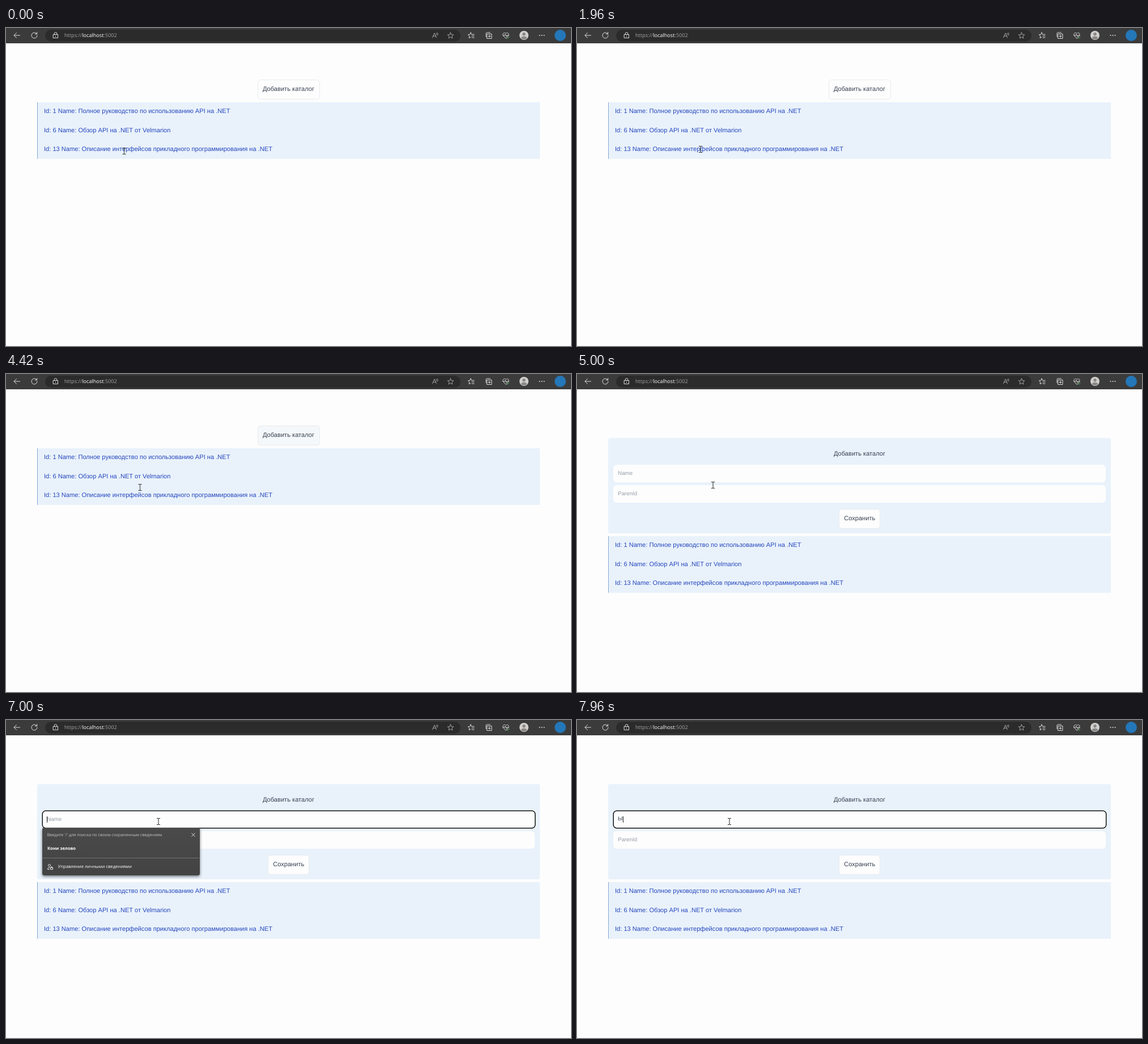
Write an HTML page that moves like this. It is 997 by 561 pixels and loops after 8000 ms.

```html
<!DOCTYPE html>
<html lang="ru">
<head>
<meta charset="utf-8">
<title>Каталог</title>
<style>
html, body { margin: 0; width: 100%; height: 100%; overflow: hidden; }
body {
  position: relative; background: #fdfdfd; color: #374151;
  font: 11.1px/16.62px "Liberation Sans", Arial, sans-serif;
  text-rendering: geometricPrecision; cursor: default;
}
#stage { position: absolute; left: 0; top: 0; width: 997px; height: 561px; overflow: hidden; }
#stage > *, .form > *, .fill > *, .layout > * { position: absolute; box-sizing: border-box; white-space: nowrap; }
.ui { font-family: "Open Sans", "Noto Sans", sans-serif; }

/* every timeline shares one loop */
.anim { animation: 8s step-end infinite; }

.bar { left: 0; top: 0; }

/* tree */
ul { margin: 0; padding: 0 0 0 10.6px; list-style: none; border-left: 1px solid #83a8d4; overflow: hidden; }
li { padding: 8.3px 0; color: #2546bd; }
li:has(ul) { padding-bottom: 0; }
li > ul { margin-bottom: 8.3px; }
.tree { left: 55.4px; top: 131px; width: 886.2px; background: #e9f2fb; animation-name: shift; }
.outer { animation-name: outer; }
.inner { animation-name: inner; }
@keyframes shift { 0%, 100% { transform: none; } 56.25% { transform: translateY(155px); } }
@keyframes outer { 0%, 100% { max-height: 0; } 3.125% { max-height: 100px; } 22.5% { max-height: 0; } }
@keyframes inner { 0%, 100% { max-height: 0; } 6.5% { max-height: 100px; } 18.75% { max-height: 0; } }

/* buttons and form */
.btn {
  display: flex; align-items: center; justify-content: center; height: 35px;
  background: #fdfdfd; border: 1px solid #e8ebee; border-radius: 5px;
}
.add { left: 443.5px; top: 90.5px; width: 110px; animation-name: add; }
@keyframes add {
  0%, 100% { visibility: visible; background: #fdfdfd; }
  43.5% { visibility: visible; background: #f5f8fa; }
  56.25% { visibility: hidden; }
}
.form { left: 55.4px; top: 112.5px; width: 886.2px; height: 168px; background: #e9f2fb; border-radius: 4px; animation-name: form; }
@keyframes form { 0%, 100% { visibility: hidden; } 56.25% { visibility: visible; } }
.form h1 { margin: 0; left: 0; right: 0; top: 20px; font: inherit; text-align: center; }
.field {
  left: 8.3px; width: 869.6px; height: 31px; padding-left: 8.5px; border-radius: 6px;
  background: #fdfdfd; color: #979da8; font-size: 9.7px; line-height: 31px;
}
.save { left: 406.6px; top: 125px; width: 73.5px; }
.focus {
  left: 65px; top: 161px; width: 868px; height: 29px; border-radius: 5px;
  box-shadow: 0 0 0 1.5px #111; animation-name: focus;
}
@keyframes focus { 0%, 100% { visibility: hidden; } 73% { visibility: visible; } }

.hint { animation-name: hint; }
@keyframes hint { 0%, 100% { visibility: hidden; } 56.25% { visibility: visible; } 97.8% { visibility: hidden; } }
.typed { left: 72px; top: 167px; font-size: 9.7px; animation-name: typed; }
@keyframes typed { 0%, 100% { visibility: hidden; } 97.8% { visibility: visible; } }
.caret { left: 72px; top: 170px; width: 1px; height: 11px; background: #222; animation-name: caret; }
@keyframes caret {
  0%, 100% { visibility: hidden; transform: none; }
  73.5% { visibility: visible; }
  79.25% { visibility: hidden; }
  86% { visibility: visible; }
  93.2% { visibility: hidden; }
  97.8% { visibility: visible; transform: translateX(9px); }
}

/* autofill list */
.fill {
  left: 64.4px; top: 190.4px; width: 277.4px; height: 83.4px; border-radius: 3px; color: #fff;
  background: linear-gradient(#4a4a4a, #434343); box-shadow: 0 2px 5px #0008; animation-name: fill;
}
@keyframes fill { 0%, 100% { visibility: hidden; } 73% { visibility: visible; } 97.8% { visibility: hidden; } }
.fill .tip { left: 8px; top: 4.5px; font-size: 7.25px; color: #c4c4c4; }
.fill b { left: 8.5px; top: 29px; font-size: 7.6px; }
.fill .manage { left: 27px; top: 61px; font-size: 7.7px; }
.fill svg { left: 0; top: 0; }

/* keyboard layout flyout */
.layout {
  left: 740px; top: 526.5px; width: 248px; height: 60px; border-radius: 6px; color: #fff;
  background: linear-gradient(#232323 33px, #4a4a4a 33px, #4a4a4a 34px, #232323 34px);
  box-shadow: 0 0 5px #0007; animation: layout 8s ease-out infinite;
}
@keyframes layout {
  0%, 90% { transform: translateY(45px); }
  92%, 94% { transform: none; }
  96.5%, 100% { transform: translateY(45px); }
}
.layout .name { left: 10px; top: 8.8px; font-size: 9.45px; }
.layout .win { left: 116.5px; top: 13px; width: 7px; height: 7px; background: #ddd; }
.layout .key {
  left: 129px; top: 11px; width: 35px; height: 11px; border: 1px solid #8a8a8a; border-radius: 2px;
  font-size: 6.8px; line-height: 9px; text-align: center; color: #e2e2e2;
}

/* pointer */
.pointer { left: 0; top: 0; animation: move 8s ease-in-out infinite; }
.pointer svg { position: absolute; overflow: visible; width: 1px; height: 1px; }
.beam { animation-name: beam; }
.arrow { animation-name: arrow; }
@keyframes move {
  0%, 2.5% { transform: translate(208.5px, 217px); }
  6%, 7% { transform: translate(220px, 239px); }
  11%, 11.5% { transform: translate(229px, 285px); }
  17.5%, 19% { transform: translate(222px, 240px); }
  21.5%, 25% { transform: translate(218px, 214px); }
  32.875%, 33.5% { transform: translate(289px, 162px); }
  35.5% { transform: translate(280px, 165px); }
  37.5%, 39.5% { transform: translate(240px, 199px); }
  45%, 52% { transform: translate(480px, 111px); }
  55.25%, 59.5% { transform: translate(236.5px, 200px); }
  62.5% { transform: translate(240px, 196px); }
  70.5%, 100% { transform: translate(269px, 179px); }
}
@keyframes beam {
  0%, 100% { visibility: visible; }
  8% { visibility: hidden; } 15.5% { visibility: visible; }
  26% { visibility: hidden; } 54% { visibility: visible; }
  90.5% { visibility: hidden; } 95.55% { visibility: visible; }
}
@keyframes arrow {
  0%, 100% { visibility: hidden; }
  8% { visibility: visible; } 15.5% { visibility: hidden; }
  26% { visibility: visible; } 54% { visibility: hidden; }
  90.5% { visibility: visible; } 95.55% { visibility: hidden; }
}
</style>
</head>
<body>
<div id="stage">
  <svg class="bar" width="997" height="28" fill="none" stroke="#dedede" stroke-linecap="round" stroke-linejoin="round">
    <path d="M0 0H997V27H0Z" fill="#3b3b3b" stroke="none"/>
    <rect x="69" y="3" width="733" height="21" rx="10.5" fill="#2b2b2b" stroke="none"/>
    <path d="M24.5 13H14M18.5 8.5L14 13L18.5 17.5"/>
    <path d="M54.3 10.5A5 5 0 1 0 55 13M54.6 7.5V10.7H51.4"/>
    <path d="M83.5 11.5H91.5V17.5H83.5ZM85.2 11.5V10A2.3 2.3 0 0 1 89.8 10V11.5M87.5 14V15"/>
    <g class="ui" stroke="none" font-size="9.15">
      <text x="103" y="16.4" fill="#a3a3a3">https://<tspan fill="#fff">localhost</tspan>:5002</text>
    </g>
    <g stroke="#b0b0b0" stroke-width=".9">
      <path d="M752.5 17L756 9L759.5 17M753.7 14.3H758.3M759.2 9.2Q760.5 10.5 759.6 12M761 8.3Q763 10.5 761.5 13"/>
      <path d="M784.5 8L786 11.6L789.8 11.9L786.9 14.4L787.8 18.1L784.5 16.1L781.2 18.1L782.1 14.4L779.2 11.9L783 11.6Z"/>
    </g>
    <path d="M820 8L821.4 11.3H826M820 8L818.5 11.4L815.3 11.8L817.8 14.2L817 17.8L819.8 16.2M822 14H826M822 17H826"/>
    <path d="M849 10.5H857V18.5H849ZM853 12.3V16.7M850.8 14.5H855.2M847 15.7V9.5Q847 8 848.5 8H854.5"/>
    <path d="M882 18.3L877.5 13.7C875 10.6 879.2 6.3 882 9.8C884.8 6.3 889 10.6 886.5 13.7ZM877 13H880L881.2 11L883 15L884 13H887"/>
    <path d="M884 17L885.6 18.4L888 15.6" stroke="#37b34a"/>
    <g stroke="none">
      <circle cx="914" cy="13" r="8" fill="#d2d0ce"/>
      <circle cx="914" cy="10.8" r="2.8" fill="#8a8886"/>
      <path d="M908.8 18.2Q909.2 14.8 914 14.8T919.2 18.2Q914 22 908.8 18.2" fill="#8a8886"/>
      <g fill="#dedede"><circle cx="941.5" cy="13" r="1"/><circle cx="945.5" cy="13" r="1"/><circle cx="949.5" cy="13" r="1"/></g>
      <circle cx="978" cy="13" r="10" fill="#2477b8"/>
    </g>
  </svg>

  <div class="btn add anim">Добавить каталог</div>

  <div class="form anim">
    <h1>Добавить каталог</h1>
    <div class="field" style="top:47px"><span class="hint anim">Name</span></div>
    <div class="field" style="top:83px">ParenId</div>
    <div class="btn save">Сохранить</div>
  </div>

  <ul class="tree anim">
    <li>Id: 1 Name: Полное руководство по использованию API на .NET</li>
    <li>Id: 6 Name: Обзор API на .NET от Velmarion</li>
    <li>Id: 13 Name: Описание интерфейсов прикладного программирования на .NET
      <ul class="outer anim">
        <li>Id: 17 Name: Учебник по созданию веб-API на .NET с помощью ASP.NET Core
          <ul class="inner anim">
            <li>Id: 11 Name: Описание интерфейсов прикладного программирования на .NET</li>
          </ul>
        </li>
      </ul>
    </li>
  </ul>

  <div class="focus anim"></div>
  <div class="typed anim">Ы</div>
  <div class="caret anim"></div>

  <div class="fill ui anim">
    <svg width="277" height="83" fill="none" stroke="#e6e6e6">
      <path d="M0 53.5H277" stroke="#727272"/>
      <path d="M263.5 9.5L269.5 15.5M269.5 9.5L263.5 15.5"/>
      <circle cx="12.5" cy="66.5" r="2"/>
      <path d="M13 73.5H9.5V72.5Q9.5 70.5 12 70.5H13.5M14.5 70.5H18.5V73.5H14.5ZM15.5 70.5V69H17.5V70.5"/>
    </svg>
    <span class="tip">Введите '/' для поиска по своим сохраненным сведениям</span>
    <b>Кони зелово</b>
    <span class="manage">Управление личными сведениями</span>
  </div>

  <div class="layout ui">
    <span class="name">Раскладка клавиатуры</span>
    <i class="win"></i>
    <span class="key">ПРОБЕЛ</span>
  </div>

  <div class="pointer">
    <svg class="beam anim"><path d="M-3 -5.5H-.7L0 -5L.7 -5.5H3M0 -5V5M-3 5.5H-.7L0 5L.7 5.5H3" fill="none" stroke="#222"/></svg>
    <svg class="arrow anim"><path d="M0 0V11L2.6 8.7L4.4 12.7L6.2 11.9L4.5 8H8Z" fill="#fff" stroke="#333" stroke-width=".9"/></svg>
  </div>
</div>
</body>
</html>
```
